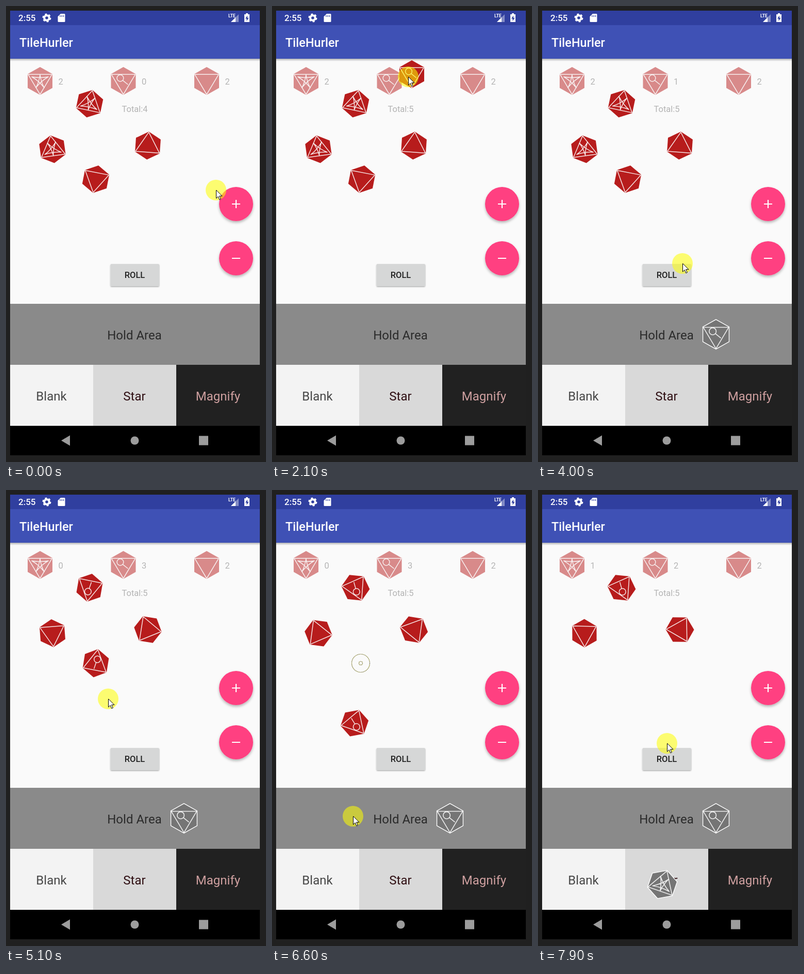
These frames come from a looping animation (504 by 882 pixels, 8 s). An HTML page:

```html
<!DOCTYPE html>
<html lang="en">
<head>
<meta charset="utf-8">
<title>Dice table</title>
<style>
  html, body { margin: 0; width: 100%; height: 100%; overflow: hidden; background: #202020; }
  svg { display: block; width: 504px; height: 882px; font-family: Roboto, sans-serif; }
  .medium { font-weight: 500; }
  .mid { text-anchor: middle; }
  .label { font-size: 24px; }
  .tally { font-size: 16.5px; fill: #b4b4b4; }
  .face { fill: none; stroke: #fff; stroke-opacity: .88; stroke-width: 1.5; stroke-linejoin: round; }
</style>
</head>
<body>
<svg viewBox="0 0 504 882">
  <defs>
    <filter id="soft" x="-30%" y="-30%" width="160%" height="170%">
      <feDropShadow dx="0" dy="3" stdDeviation="2.6" flood-opacity=".28"/>
    </filter>
    <filter id="low" x="-10%" y="-20%" width="120%" height="150%">
      <feDropShadow dx="0" dy="1.2" stdDeviation="1.2" flood-opacity=".35"/>
    </filter>
    <linearGradient id="edge" x2="0" y2="1">
      <stop stop-opacity=".28"/><stop offset="1" stop-opacity="0"/>
    </linearGradient>
    <path id="hex" d="M0-27 24-13.5V13.5L0 27-24 13.5V-13.5Z"/>
    <path id="blank" d="M-23.300-12.800H23.300L0 26Z"/>
    <g id="magnify"><use href="#blank"/><circle cx="-6" cy="-5.5" r="6.4"/><path d="M-1.2-1.2 9 7"/></g>
    <g id="star"><use href="#blank"/>
      <path d="M0-12Q2 2 8 13Q-2 0-16-8Q0-5 16-8Q2 0-8 13Q-2 2 0-12Z"/></g>
    <g id="ring"><circle r="17.5"/><circle r="3.5"/></g>
  </defs>

  <rect width="504" height="882" fill="#202020"/>
  <rect x="8" y="9" width="484" height="568" fill="#fafafa"/>
  <rect x="8" y="102" width="484" height="5" fill="url(#edge)"/>
  <rect x="8" y="9" width="484" height="28" fill="#303f9f"/>
  <rect x="8" y="37" width="484" height="65" fill="#3f51b5"/>

  <g fill="#fff">
    <text class="medium" x="24" y="29" font-size="17">2:55</text>
    <circle cx="79" cy="23" r="4.8" fill="none" stroke="#fff" stroke-width="4"/>
    <circle cx="79" cy="23" r="7.2" fill="none" stroke="#fff" stroke-width="2.6" stroke-dasharray="3.77"/>
    <path d="M106 15h7q1.500 0 1.500 1.500v13q0 1.500-1.500 1.500h-11q-1.500 0-1.500-1.500V20.500Z"/>
    <path d="M105 18v3M108.300 18v3M111.500 18v3" stroke="#303f9f" stroke-width="1.3"/>
    <text x="431" y="22" font-size="8.5" font-weight="700">LTE</text>
    <path d="M451 16V31H436Z" opacity=".4"/>
    <path d="M445 22V31H436Z"/>
    <path d="M465 14h4v2h3v15h-10V16h3Z"/>
    <path d="M468 18.500 464 24.500h2.500v4.500l4-6h-2.500Z" fill="#303f9f"/>
    <text class="medium" x="26" y="79" font-size="23.5">TileHurler</text>
  </g>

  <g opacity=".5" id="legend"></g>
  <text class="tally" id="stars" x="101.5" y="151.5"></text>
  <text class="tally" id="lenses" x="263" y="151.5"></text>
  <text class="tally" x="424.5" y="151.5">2</text>
  <text class="tally mid" id="total" x="249.5" y="205"></text>

  <g fill="#ff4081" filter="url(#soft)">
    <circle cx="446" cy="383" r="33"/><circle cx="446" cy="488" r="33"/>
  </g>
  <path d="M438 383h16M446 375v16M438 488h16" stroke="#fff" stroke-width="2.2"/>
  <rect x="202.5" y="499" width="94.500" height="43" rx="2" fill="#d6d7d7" filter="url(#low)"/>
  <text class="medium mid" x="249.5" y="526.300" font-size="16.5" fill="#212121">ROLL</text>

  <rect x="8" y="576" width="484" height="118" fill="#8a8a8a"/>
  <rect x="8" y="694" width="161" height="118" fill="#f3f3f3"/>
  <rect x="169" y="694" width="161" height="118" fill="#d9d9d9"/>
  <rect x="330" y="694" width="162" height="118" fill="#212121"/>
  <g class="label mid">
    <text x="249" y="644.5" fill="#2b2b2b">Hold Area</text>
    <text x="88" y="762.5" fill="#474747">Blank</text>
    <text x="249" y="762.5" fill="#301014">Star</text>
    <text x="411" y="762.5" fill="#cfa0a0">Magnify</text>
  </g>
  <rect x="8" y="812" width="484" height="57" fill="#000"/>
  <g fill="#9c9c9c">
    <path d="M107 840.500 124 830.500V850.500Z"/>
    <circle cx="249.5" cy="840.5" r="8"/>
    <rect x="374" y="831.5" width="18" height="18"/>
  </g>

  <g id="dice"></g>
  <g id="press" fill="none" stroke-width="1.2" transform="translate(172 335)">
    <use href="#ring" stroke="#e0dc6a"/>
    <use href="#ring" stroke="#777799" stroke-dasharray="1.5"/>
  </g>
  <g id="cursor">
    <circle r="20" fill="#ff0" fill-opacity=".55"/>
    <path d="M.5 0V16L4.200 12.500 6.800 18.600 9.300 17.500 6.700 11.600H12Z" fill="#fff" stroke="#000"/>
  </g>
</svg>
<script>
const LOOP = 8000, STEP = 100, LAG = 200;
const ADD = 700, ROLL = 4200, GRAB = 6200, STAR_DROP = 7000;
const $ = id => document.getElementById(id);

// Pointer moves as [start, end, x, y]; it rests between them.
const home = [407, 356];
const moves = [
  [0, 200, 441, 382],
  [1200, 2100, 264, 137],
  [2100, 2600, 377, 530], [2600, 2800, 344, 611], [2800, 3200, 338, 640],
  [3500, 4000, 280, 498], [4000, ROLL, 270, 527],
  [4800, 5100, 198, 404], [5100, 5600, 172, 335],
  [GRAB, 6400, 158, 451], [6400, 6600, 157, 631], [6600, 7000, 239, 763],
  [7200, 7900, 250, 490]
];

function pointer(t) {
  let [x, y] = home;
  for (const [start, end, toX, toY] of moves) {
    const u = Math.min(1, Math.max(0, (t - start) / (end - start)));
    x += (toX - x) * u;
    y += (toY - y) * u;
  }
  return [x, y];
}

// A held die trails the pointer and keeps the offset it was grabbed with.
function dragged(t, grab, drop, dx, dy) {
  const [x, y] = pointer(Math.min(drop, Math.max(grab, t - LAG)));
  return [x + dx, y + dy];
}

const dice = [
  { at: [162, 189], start: 192, rest: -145, stop: 6400, before: 'star', after: 'magnify' },
  { at: [90, 277], start: 172, rest: -120, stop: 7950, before: 'star', after: 'blank' },
  { at: [275, 270], start: 184, rest: -150, stop: 7120, before: 'blank', after: 'blank' },
  { at: [174, 335], start: 11, rest: -161, stop: GRAB, before: 'blank', after: 'magnify', rate: 200, held: true }
];

// Each rolled die slows down until it stops at its resting angle.
function angle({ start, rest, stop, rate = 24 }, t) {
  return t < ROLL ? start : rest + rate * Math.max(0, (stop - t) / 1000) ** 1.5;
}

function die(face, [x, y], turn = 0) {
  const parked = y > 590;
  const body = parked
    ? 'fill="#757575" stroke="#fff" stroke-width="1.3"'
    : 'fill="#b71c1c"';
  return `<g transform="translate(${x} ${y}) rotate(${turn}) scale(${parked ? 1.06 : 1})">` +
    `<use href="#hex" ${body}/><use class="face" href="#${face}"/></g>`;
}

function draw(t) {
  const rolled = t >= ROLL, starred = t >= STAR_DROP, added = t >= ADD;
  let html = '';
  for (const d of dice) {
    const face = d.held && starred ? 'star' : rolled ? d.after : d.before;
    const at = d.held && t >= GRAB ? dragged(t, GRAB, STAR_DROP, 2, 0) : d.at;
    html += die(face, at, angle(d, t));
  }
  if (added) html += die('magnify', dragged(t, 2100, 3200, 7, -5));
  $('dice').innerHTML = html;
  $('stars').textContent = starred ? 1 : rolled ? 0 : 2;
  $('lenses').textContent = starred ? 2 : rolled ? 3 : added ? 1 : 0;
  $('total').textContent = 'Total:' + (added ? 5 : 4);
  $('press').style.display = t > GRAB && t < STAR_DROP ? '' : 'none';
  $('cursor').setAttribute('transform', `translate(${pointer(t)})`);
}

$('legend').innerHTML = die('star', [66, 145]) + die('magnify', [227.5, 145]) + die('blank', [389, 145]);

const begin = performance.now();
let shown = -1;
function tick() {
  const t = Math.floor((performance.now() - begin) % LOOP / STEP) * STEP;
  if (t !== shown) draw(shown = t);
  requestAnimationFrame(tick);
}
tick();
</script>
</body>
</html>
```
